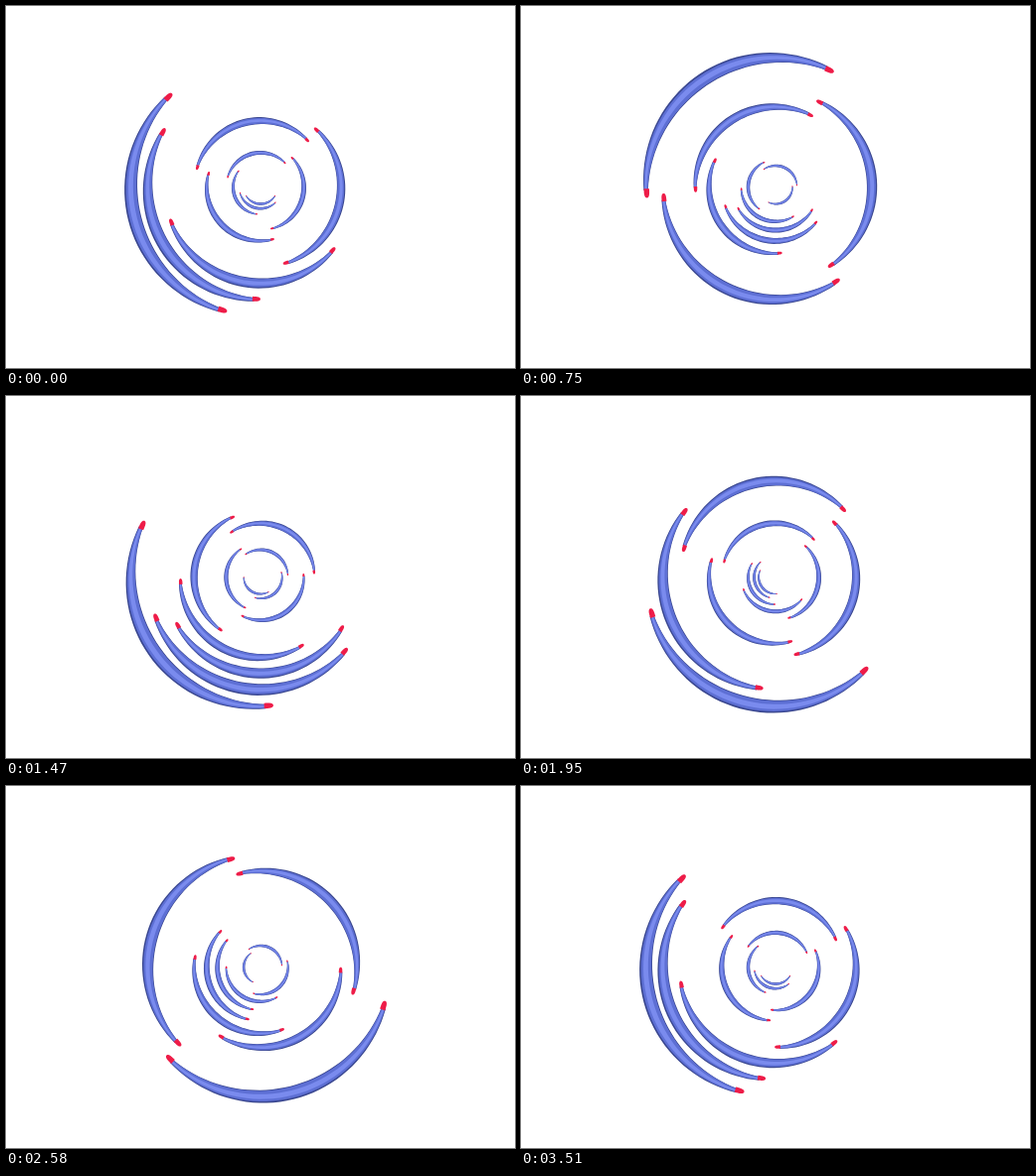
An HTML page with a canvas that plays this animation: 512x365 px, repeating every 3.54 s.

```html
<!DOCTYPE html>
<html lang="en">
<head>
<meta charset="utf-8">
<title>Rotating arcs</title>
<style>
html, body { margin: 0; width: 100%; height: 100%; overflow: hidden; background: #fff; }
canvas { display: block; width: 512px; height: 365px; }
</style>
</head>
<body>
<canvas id="stage" width="512" height="365"></canvas>
<script>
const ctx = document.getElementById('stage').getContext('2d');
const CX = 256.1, CY = 182.6;
const RADII = [130.5, 113.5, 97, 81, 67, 54.3, 43.5, 34.7, 27.6, 21.6, 17];
const STEP = 30, STEPS = 118, LAG = 6;
const BLUE_END = 57.5, RED_END = 60.8;
const rad = deg => deg * Math.PI / 180;

// Swing: speed up to 20 degrees per step, cruise, brake, then the same way back.
function swing(step) {
  const half = STEPS / 2;
  const u = Math.abs((step - 0.5 + half + STEPS) % STEPS - half);
  if (u < 20) return 166 - u * u / 2;
  const cruise = 366 - 20 * u + Math.max(0, u - 41) ** 2 / 2;
  const stop = -630 + (half - u) ** 2 / 2;
  return u < 41 ? cruise : Math.max(cruise, stop);
}

// Strip along a circle; lo and hi are fractions of the half width.
function band(r, mid, from, to, lo, hi, halfWidth, color) {
  const n = 40;
  ctx.beginPath();
  for (let j = 0; j <= 2 * n + 1; j++) {
    const back = j > n;
    const k = (back ? 2 * n + 1 - j : j) / n;
    const a = from + (to - from) * k;
    const d = r + (back ? lo : hi) * halfWidth(a);
    const t = rad(mid + a);
    ctx.lineTo(CX + d * Math.cos(t), CY + d * Math.sin(t));
  }
  ctx.closePath();
  ctx.fillStyle = color;
  ctx.fill();
}

function drawArc(r, mid) {
  const w = r * 0.049 + 0.4;
  const body = a => w * (0.32 + 0.68 * Math.cos(rad(a / BLUE_END * 90)));
  const tip = a => {
    const k = (Math.abs(a) - BLUE_END + 0.8) / (RED_END - BLUE_END + 0.8);
    return w * 0.4 * Math.sqrt(Math.max(0, 1 - k ** 4));
  };
  const tube = (lo, hi, color) => band(r, mid, -BLUE_END, BLUE_END, lo, hi, body, color);
  tube(-1, 1, '#3a478f');
  tube(-0.88, 0.76, '#5d6fd4');
  tube(-0.35, 0.4, '#7a8bee');
  band(r - w * 0.1, mid, BLUE_END - 0.8, RED_END, -1, 1, tip, '#ee1c48');
  band(r - w * 0.1, mid, -RED_END, 0.8 - BLUE_END, -1, 1, tip, '#ee1c48');
}

function draw(now) {
  const step = Math.floor(now / STEP) % STEPS;
  ctx.fillStyle = '#fff';
  ctx.fillRect(0, 0, 512, 365);
  RADII.forEach((r, i) => drawArc(r, swing(step + i * LAG)));
}

let start;
function tick(now) {
  start ??= now;
  draw(now - start);
  requestAnimationFrame(tick);
}
draw(0);
requestAnimationFrame(tick);
</script>
</body>
</html>
```
